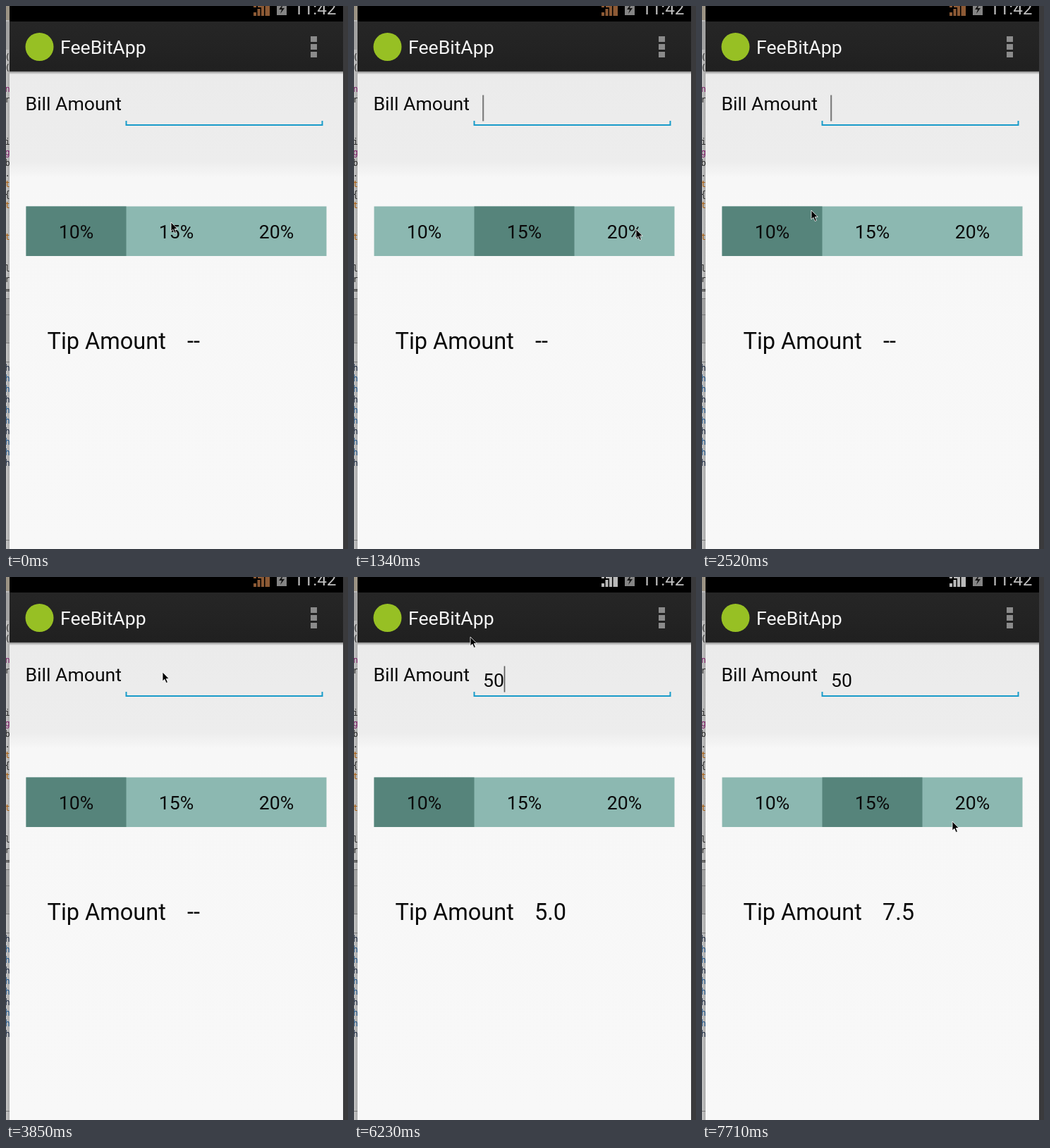
Recreate the animation shown at these times as an HTML page. Size 485 by 771 pixels, loop 8 s.

```html
<!DOCTYPE html>
<html lang="en">
<head>
<meta charset="utf-8">
<title>Tip calculator</title>
<style>
html, body { margin: 0; width: 100%; height: 100%; overflow: hidden; background: #f8f8f8; }
svg { display: block; width: 100vw; height: 100vh; }
text { font-family: Roboto, "Noto Sans", sans-serif; font-size: 26.6px; fill: #0a0a0a; white-space: pre; }
.large { font-size: 32.5px; }
.middle { text-anchor: middle; }
.code text { font: 12px "DejaVu Sans Mono", monospace; }

/* Every part holds its pose until the next key; 1% = 80 ms. */
.selected, .pointer, .caret, .blink, .empty, .one, .two, .five, .seven, .weak, .strong {
  animation: 8s step-end infinite;
}
.selected { animation-name: selected; }
.pointer { animation-name: pointer; }
.caret { animation-name: caret; }
.blink { animation-name: blink; }
.empty { animation-name: empty; }
.one { animation-name: one; }
.two { animation-name: two; }
.five { animation-name: five; }
.seven { animation-name: seven; }
.weak { animation-name: weak; }
.strong { animation-name: strong; }

@keyframes selected {
  0%, 29.625% { transform: translateX(28.5px); }
  7.375%, 89% { transform: translateX(170.5px); }
  18.625% { transform: translateX(312.5px); }
  100% { transform: translateX(170.5px); }
}
@keyframes pointer {
  0% { transform: translate(234px, 307px); }
  1.875% { transform: translate(239px, 313px); }
  3.75% { transform: translate(242px, 318px); }
  13% { transform: translate(290px, 319px); }
  14.875% { transform: translate(360px, 318px); }
  16.75% { transform: translate(400px, 317px); }
  20.5% { transform: translate(354px, 320px); }
  22.25% { transform: translate(270px, 322px); }
  24.125% { transform: translate(185px, 323px); }
  26% { transform: translate(147px, 323px); }
  31.375% { transform: translate(155px, 290px); }
  33.25% { transform: translate(190px, 189px); }
  35.125% { transform: translate(222px, 135px); }
  76% { transform: translate(185px, 84px); }
  77.875% { transform: translate(165px, 85px); }
  79.75% { transform: translate(154px, 150px); }
  81.625% { transform: translate(175px, 260px); }
  83.5% { transform: translate(213px, 335px); }
  85.25% { transform: translate(216px, 330px); }
  92.75% { transform: translate(250px, 336px); }
  94.5% { transform: translate(320px, 345px); }
  96.375%, 100% { transform: translate(355px, 347px); }
}
@keyframes caret {
  0% { transform: translateX(182.4px); }
  57.375% { transform: translateX(197.6px); }
  64.875%, 100% { transform: translateX(212.7px); }
}
@keyframes blink {
  0%, 9.25%, 22.25%, 35.125%, 48.125%, 70.375%, 83.5%, 96.375%, 100% { opacity: 0; }
  1.875%, 14.875%, 29.625%, 40.75%, 53.75%, 76%, 89% { opacity: 1; }
}
@keyframes empty { 0% { opacity: 1; } 57.375%, 100% { opacity: 0; } }
@keyframes one { 0%, 64.875%, 100% { opacity: 0; } 57.375% { opacity: 1; } }
@keyframes two { 0% { opacity: 0; } 64.875%, 100% { opacity: 1; } }
@keyframes five { 0%, 89%, 100% { opacity: 0; } 64.875% { opacity: 1; } }
@keyframes seven { 0% { opacity: 0; } 89%, 100% { opacity: 1; } }
@keyframes weak { 0% { opacity: 1; } 77.875%, 100% { opacity: 0; } }
@keyframes strong { 0% { opacity: 0; } 77.875%, 100% { opacity: 1; } }
</style>
</head>
<body>
<svg viewBox="0 0 485 771" preserveAspectRatio="none">
  <defs>
    <linearGradient id="page" gradientUnits="userSpaceOnUse" x1="0" y1="94" x2="0" y2="771">
      <stop offset="0" stop-color="#ebebeb"/>
      <stop offset=".187" stop-color="#ededed"/>
      <stop offset=".222" stop-color="#f7f7f7"/>
      <stop offset="1" stop-color="#f8f8f8"/>
    </linearGradient>
    <linearGradient id="bar" x1="0" y1="0" x2="0" y2="1">
      <stop offset="0" stop-color="#262626"/>
      <stop offset="1" stop-color="#202020"/>
    </linearGradient>
    <linearGradient id="shadow" x1="0" y1="0" x2="0" y2="1">
      <stop offset="0" stop-color="#000" stop-opacity=".4"/>
      <stop offset="1" stop-color="#000" stop-opacity="0"/>
    </linearGradient>
    <linearGradient id="edge">
      <stop offset="0" stop-color="#c6c6c6"/>
      <stop offset="1" stop-color="#a9a9a9"/>
    </linearGradient>
    <path id="signal" d="M351 14V9h4v5zM356.500 14V4h4v10zM362 14V-1h4v15zM367.500 14V-6h6.500v20zM351 0h4v2h-4zM357 0h5v2h-5z"/>
  </defs>

  <!-- Editor window showing behind the phone -->
  <rect width="5" height="771" fill="url(#edge)"/>
  <path d="M0 0h5v20H0z" fill="#9b9384"/>
  <path d="M0 22h5v40H0zM0 416h5v62H0z" fill="#a2a2a2"/>
  <path d="M0 415.500h5M0 438.500h5M0 478.500h5M0 505.500h5M0 758.500h5" stroke="#777"/>
  <g class="code" id="code"></g>

  <rect x="5" width="473" height="771" fill="url(#page)"/>
  <rect x="478" width="7" height="771" fill="#3a3a3c"/>

  <!-- Status and title bars -->
  <rect x="5" width="473" height="22" fill="#000"/>
  <use href="#signal" class="weak" fill="#8d5a35"/>
  <use href="#signal" class="strong" fill="#b9b9b9"/>
  <path d="M384 -5h14v18h-14z" fill="#858585"/>
  <path d="M393 -3l-6 8h4l-2 6 6-8h-4z" fill="#151515"/>
  <text x="408" y="12" style="font-size:24.300px;fill:#bdbdbd">11:42</text>
  <rect x="5" y="22" width="473" height="71" fill="url(#bar)"/>
  <path d="M5 92.500h473" stroke="#333"/>
  <rect x="5" y="93" width="473" height="4" fill="url(#shadow)"/>
  <circle cx="47.500" cy="58" r="20" fill="#97c024"/>
  <text x="77" y="67.500" style="fill:#f4f4f4">FeeBitApp</text>
  <path d="M432 43h9v8h-9zM432 54h9v8h-9zM432 65h9v8h-9z" fill="#8b8b8b"/>

  <!-- Bill amount -->
  <text x="27.500" y="148">Bill Amount</text>
  <path d="M170.500 163v6H448.500v-6" fill="none" stroke="#199bc9" stroke-width="2"/>
  <text class="one" x="183" y="155.500">5</text>
  <text class="two" x="183" y="155.500">50</text>
  <g class="blink"><rect class="caret" y="126.500" width="1.400" height="37" fill="#454545"/></g>

  <!-- Tip rate -->
  <rect x="28.500" y="284.500" width="426" height="70.500" fill="#8cb8b1"/>
  <rect class="selected" y="284.500" width="142" height="70.500" fill="#56847b"/>
  <g class="middle">
    <text x="99.500" y="330">10%</text>
    <text x="241.500" y="330">15%</text>
    <text x="383.500" y="330">20%</text>
  </g>

  <!-- Tip amount -->
  <text class="large" x="58.500" y="486.500">Tip Amount</text>
  <text class="large empty" x="257" y="486.500">--</text>
  <text class="large one" x="256" y="486.500">0.5</text>
  <text class="large five" x="256" y="486.500">5.0</text>
  <text class="large seven" x="256" y="486.500">7.5</text>

  <path class="pointer" d="M0 0V13L2.900 10.300 5.200 15.500 7.400 14.500 5.200 9.500H9.200z"
    fill="#000" stroke="#fff" stroke-width=".8"/>
</svg>
<script>
const code = document.getElementById('code');
function glyph(char, y, fill = '#222') {
  const text = document.createElementNS('http://www.w3.org/2000/svg', 'text');
  text.setAttribute('x', -1.5);
  text.setAttribute('y', y);
  text.style.fill = fill;
  text.textContent = char;
  code.append(text);
}
const purple = '#7a1763', orange = '#a85a08';
[['(', 77], ['(', 92], ['n', 122, purple], ['r', 137], ['i', 197], ['g', 212, purple],
 ['b', 227], ['.', 242], ['t', 257, orange], ['{', 272], ['t', 287, orange],
 ['t', 332, orange], ['l', 377], ['r', 392], ['=', 407]].forEach(args => glyph(...args));
for (let row = 0; row < 10; row++) glyph('h', 518 + row * 15, row % 3 ? '#174f86' : '#14233d');
</script>
</body>
</html>
```
